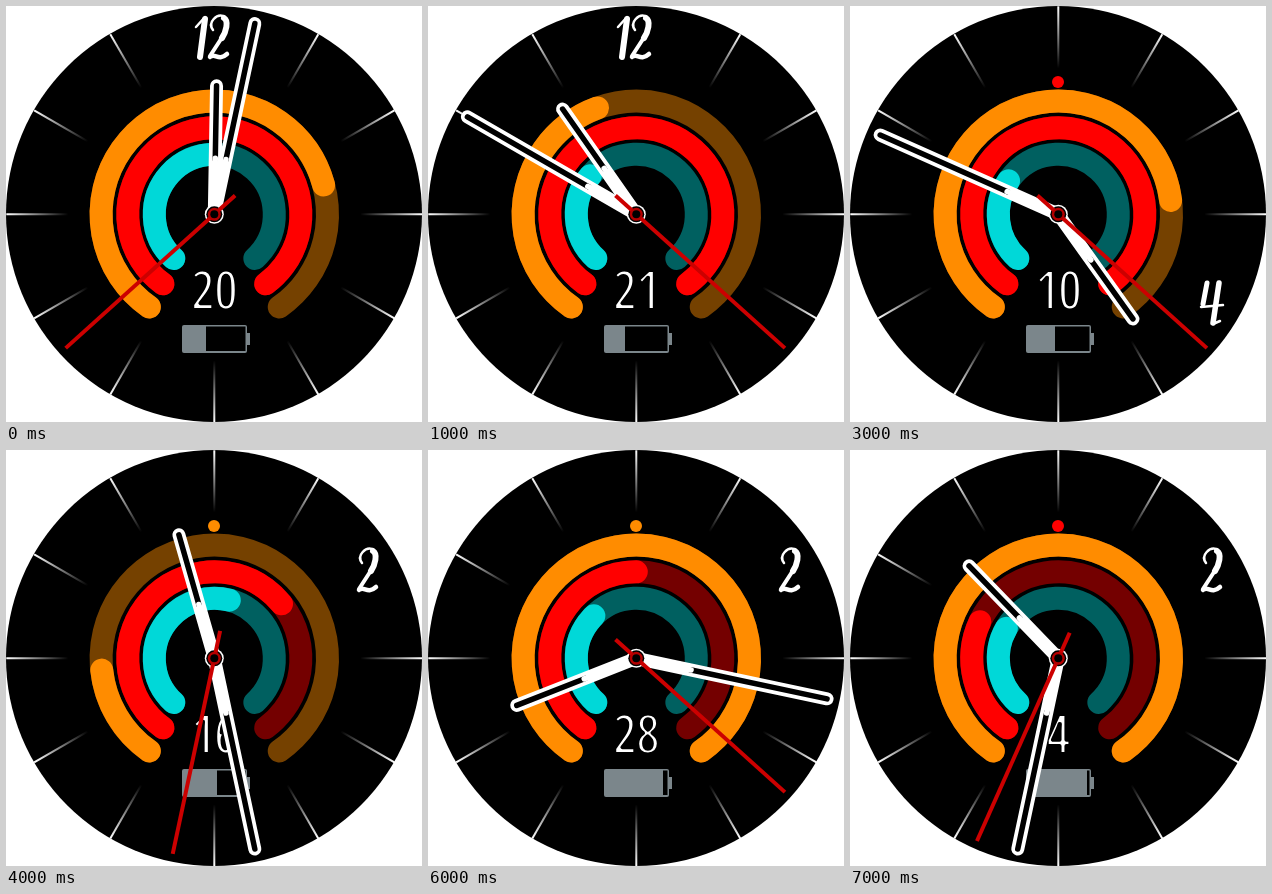
Recreate the animation shown at these times as an HTML page with a canvas. Size 416 by 416 pixels, loop 8 s.

```html
<!DOCTYPE html>
<html lang="en">
<head>
<meta charset="utf-8">
<title>Watch face</title>
<style>
  html, body { margin: 0; width: 100%; height: 100%; overflow: hidden; background: #fff; }
  canvas { display: block; width: 416px; height: 416px; }
</style>
</head>
<body>
<canvas id="face" width="416" height="416"></canvas>
<script>
const ctx = document.getElementById('face').getContext('2d');
const C = 208.3, STEP = 1000;
const ORANGE = '#ff8c00', RED = '#ff0000', GREY = '#7b868b';
const FULL = 999;

// ends: where the lit part of each ring stops, in degrees from twelve o'clock
const scenes = [
  { time: [12, 2, 38],  label: 12, date: 20, level: 200, ends: [75, FULL, 0] },
  { time: [10, 50, 22], label: 12, date: 21, level: 197, ends: [-20, FULL, -50] },
  { time: [5, 53, 38],  label: 5,  date: 26, level: 194, ends: [-132, 0, -105.5] },
  { time: [4, 49, 22],  label: 4,  date: 10, level: 205, ends: [83, FULL, -56], dot: RED },
  { time: [11, 28, 32], label: 2,  date: 16, level: 211, ends: [-96, 51, 14.5], dot: ORANGE },
  { time: [10, 30, 38], label: 2,  date: 28, level: 233, ends: [FULL, FULL, -33] },
  { time: [8, 17, 22],  label: 2,  date: 28, level: 235, ends: [FULL, 0, -45], dot: ORANGE },
  { time: [10, 32, 34], label: 2,  date: 4,  level: 237, ends: [FULL, -65, -60], dot: RED }
];

const rings = [
  { r: 113.2, gap: 35, on: ORANGE, off: '#754100' },
  { r: 86.5, gap: 36.5, on: RED, off: '#740000' },
  { r: 60, gap: 42.5, on: '#00d8d8', off: '#006060' }
];

// Hour lettering: pen width and pen path
const two = [
  [2.5, 'M356 113C350 105 360 97 366 99'],
  [6, 'M367 101C372 104 369 115 365 121'],
  [4, 'M364 122L353 139'],
  [4.5, 'M353 140C358 135 361 145 370 137']
];
const lettering = {
  2: { strokes: two },
  4: { strokes: [
    [5, 'M357 277L353 298'], [2.5, 'M351 301L373 299'],
    [5.5, 'M369 277L363 317'], [2.5, 'M363 318L370 315']
  ] },
  5: { strokes: [
    [5, 'M291 342L306 341'], [2, 'M290 341L288 361C292 356 297 356 300 358'],
    [6, 'M300 359C306 364 304 375 299 380'], [2.5, 'M299 381C293 387 286 384 286 378'],
    [6, 'M287 376L288 376']
  ] },
  12: { strokes: [[6, 'M199 13L194 51'], [2.5, 'M190 21L199 11']], pair: true }
};

const rad = deg => deg * Math.PI / 180;

function disc(x, y, r, color) {
  ctx.fillStyle = color;
  ctx.beginPath();
  ctx.arc(x, y, r, 0, 2 * Math.PI);
  ctx.fill();
}

function turned(deg, draw) {
  ctx.save();
  ctx.translate(C, C);
  ctx.rotate(rad(deg));
  draw();
  ctx.restore();
}

function spoke(from, to, width, color, cap = 'round') {
  ctx.strokeStyle = color;
  ctx.lineWidth = width;
  ctx.lineCap = cap;
  ctx.beginPath();
  ctx.moveTo(0, -from);
  ctx.lineTo(0, -to);
  ctx.stroke();
}

function drawTicks(label) {
  const fade = ctx.createLinearGradient(0, -208, 0, -146);
  fade.addColorStop(0, '#fff');
  fade.addColorStop(0.4, 'rgba(255,255,255,.6)');
  fade.addColorStop(1, 'rgba(255,255,255,0)');
  for (let hour = 1; hour <= 12; hour++) {
    if (hour !== label) turned(hour * 30, () => spoke(146, 208, 2, fade, 'butt'));
  }
}

function arc(r, from, to, color) {
  ctx.strokeStyle = color;
  ctx.lineWidth = 23;
  ctx.lineCap = 'round';
  ctx.beginPath();
  ctx.arc(C, C, r, rad(from - 90), rad(to - 90));
  ctx.stroke();
}

function drawRings(ends) {
  rings.forEach(({ r, gap, on, off }, i) => {
    const start = gap - 180, stop = 180 - gap;
    arc(r, start, stop, off);
    arc(r, start, Math.min(ends[i], stop), on);
  });
}

function drawStrokes(strokes) {
  ctx.strokeStyle = '#fff';
  ctx.lineCap = ctx.lineJoin = 'round';
  for (const [width, path] of strokes) {
    ctx.lineWidth = width;
    ctx.stroke(new Path2D(path));
  }
}

function drawLabel(label) {
  const { strokes, pair } = lettering[label];
  drawStrokes(strokes);
  if (pair) {
    ctx.save();
    ctx.translate(-149, -89);
    drawStrokes(two);
    ctx.restore();
  }
}

// A black outline slims the condensed digits to a fine line
function drawDate(date) {
  ctx.font = "300 condensed 55px 'Open Sans Condensed', 'Open Sans', sans-serif";
  ctx.letterSpacing = '-2.5px';
  ctx.textAlign = 'center';
  ctx.fillStyle = '#fff';
  ctx.fillText(date, C - 1, 304);
  ctx.strokeStyle = '#000';
  ctx.lineWidth = 4;
  ctx.lineJoin = 'round';
  ctx.strokeText(date, C - 1, 304);
}

function drawBattery(level) {
  ctx.fillStyle = GREY;
  ctx.beginPath();
  ctx.roundRect(176, 319, 65, 28, 2);
  ctx.fill();
  ctx.fillRect(240, 327, 4, 12);
  ctx.fillStyle = '#000';
  ctx.fillRect(level, 320.5, 239.5 - level, 24.5);
}

function drawHand(deg, length) {
  turned(deg, () => {
    spoke(0, length, 13, '#fff');
    spoke(55, length, 5.5, '#000');
    spoke(40, 56, 5.5, '#fff');
  });
}

function drawHands([h, m, s]) {
  drawHand(h * 30 + m / 2, 128.5);
  drawHand(m * 6, 195);
  disc(C, C, 9.5, '#fff');
  disc(C, C, 8, '#000');
  turned(s * 6, () => spoke(-28, 200, 4, '#cc0000', 'butt'));
  disc(C, C, 6.5, '#b40000');
  disc(C, C, 4, '#000');
}

function draw(scene) {
  ctx.fillStyle = '#fff';
  ctx.fillRect(0, 0, 416, 416);
  disc(208, 208, 208, '#000');
  drawTicks(scene.label);
  drawDate(scene.date);
  drawRings(scene.ends);
  if (scene.dot) disc(208, 76, 6, scene.dot);
  drawLabel(scene.label);
  drawBattery(scene.level);
  drawHands(scene.time);
}

function tick() {
  draw(scenes[Math.floor(performance.now() / STEP) % scenes.length]);
  requestAnimationFrame(tick);
}
tick();
</script>
</body>
</html>
```
